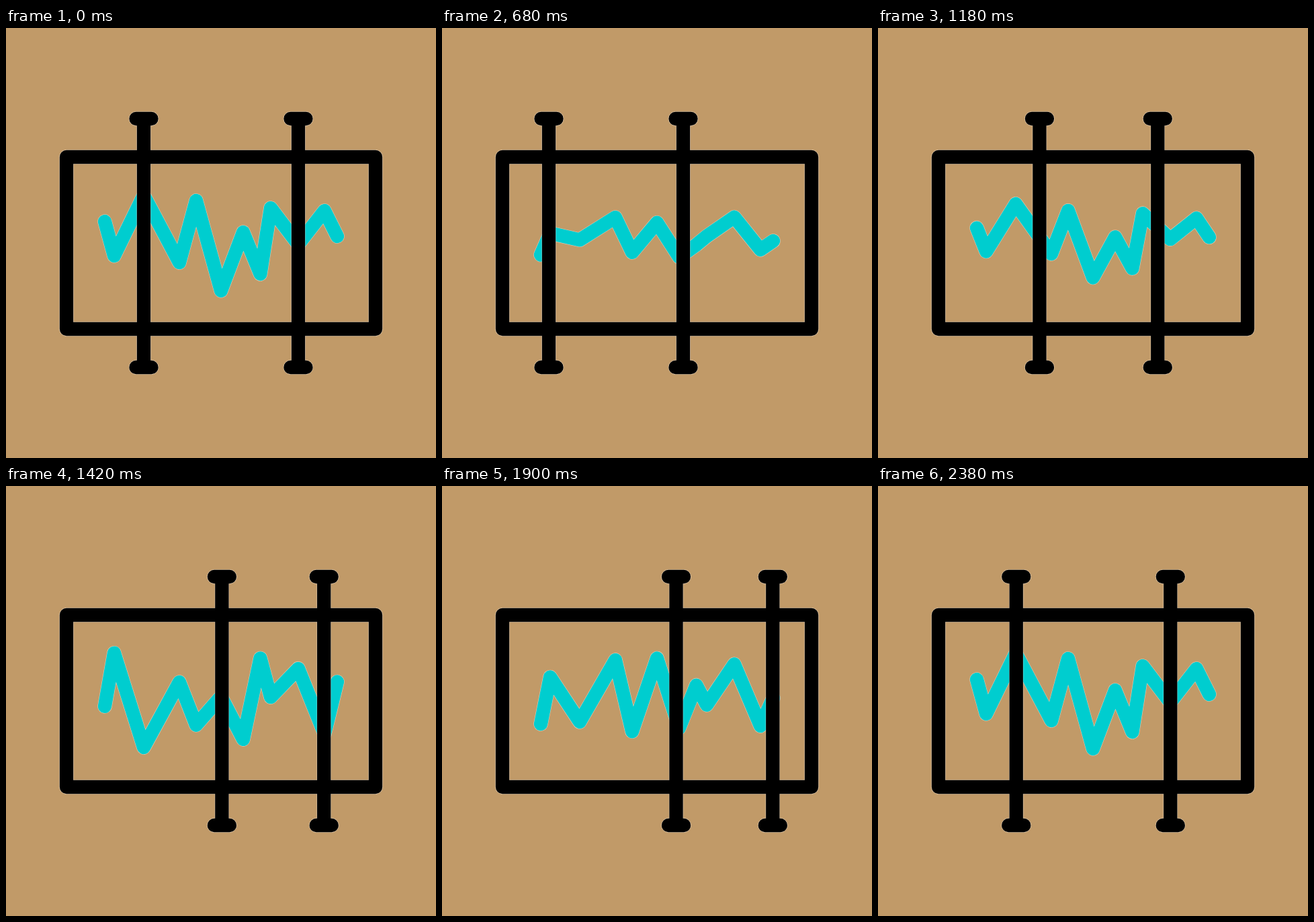
Recreate the animation shown at these times as an HTML page. Size 640 by 640 pixels, loop 2.4 s.

```html
<!DOCTYPE html>
<html lang="en">
<head>
<meta charset="utf-8">
<title>Signal range</title>
<style>
  html, body { margin: 0; width: 100%; height: 100%; overflow: hidden; background: #c19a68; }
  svg { display: block; width: 100vw; height: 100vh; fill: none; stroke-linecap: round; stroke-linejoin: round; }
  .rim { stroke: #fff; stroke-opacity: .5; stroke-width: 21.4; }
  .ink { stroke: #000; stroke-width: 20.3; }
  .cyan { stroke: #00cdcf; }
</style>
</head>
<body>
<svg viewBox="0 0 640 640">
  <defs>
    <polyline id="trace"/>
    <rect id="box" x="90" y="192" width="460" height="256"/>
    <path id="bar" d="M-11.5 135H11.5M0 135V505M-11.5 505H11.5"/>
  </defs>
  <use href="#trace" class="rim"/><use href="#trace" class="ink cyan"/>
  <use href="#box" class="rim"/>
  <g id="left"><use href="#bar" class="rim"/><use href="#bar" class="ink"/></g>
  <g id="right"><use href="#bar" class="rim"/><use href="#bar" class="ink"/></g>
  <use href="#box" class="ink"/>
</svg>
<script>
const LOOP = 2400;
const STEP = 120;
const PAUSE = 310;
const xs = [147, 161, 205, 258, 283, 320, 353, 378.5, 394, 435, 474, 493];

// A zigzag swings to alternate sides of a level; dir is the side of the first point
const zigzag = (level, dir, swings) => swings.map((s, i) => level + (i % 2 ? -dir : dir) * s);
const poses = {
  a: zigzag(315, -1, [27, 24, 66, 34, 58, 76, 11, 51, 47, 7, 43, -5]),
  b: zigzag(312, 1, [11, 70, 84, 14, 42, -12, 68, 63, 0, 39, 59, 25]),
  c: zigzag(310, 1, [49, 19, 34, 57, 57, 64, 47, 6, 18, 46, 45, -10])
};
const rhythm = "acbbcacbacacbacbcbcaa";

// Where the sliders rest, and when they leave
const stops = [
  { leave: 0, left: 205, right: 435 },
  { leave: 828, left: 159, right: 359 },
  { leave: 1915, left: 348.5, right: 492.3 }
];

const el = id => document.getElementById(id);
const mix = (a, b, k) => a + (b - a) * k;
const smooth = k => k * k * (3 - 2 * k);
const soft = k => k - 0.037 * Math.sin(2 * Math.PI * k);

function drawTrace(t) {
  const i = Math.floor(t / STEP);
  const k = soft(t / STEP - i);
  const from = poses[rhythm[i]];
  const to = poses[rhythm[i + 1]];
  const points = xs.map((x, n) => [x, mix(from[n], to[n], k)]);
  el("trace").setAttribute("points", points.join(" "));
}

function drawSliders(t) {
  const i = stops.findLastIndex(s => t >= s.leave);
  const from = stops[i];
  const to = stops[(i + 1) % stops.length];
  const arrive = (to.leave || LOOP + PAUSE) - PAUSE;
  const k = smooth(Math.min(1, (t - from.leave) / (arrive - from.leave)));
  for (const side of ["left", "right"]) {
    el(side).setAttribute("transform", `translate(${mix(from[side], to[side], k)} 0)`);
  }
}

function draw(t) {
  drawTrace(t);
  drawSliders(t);
}

let begin = null;
function tick(now) {
  begin ??= now;
  draw(Math.max(0, now - begin) % LOOP);
  requestAnimationFrame(tick);
}

draw(0);
requestAnimationFrame(tick);
</script>
</body>
</html>
```
